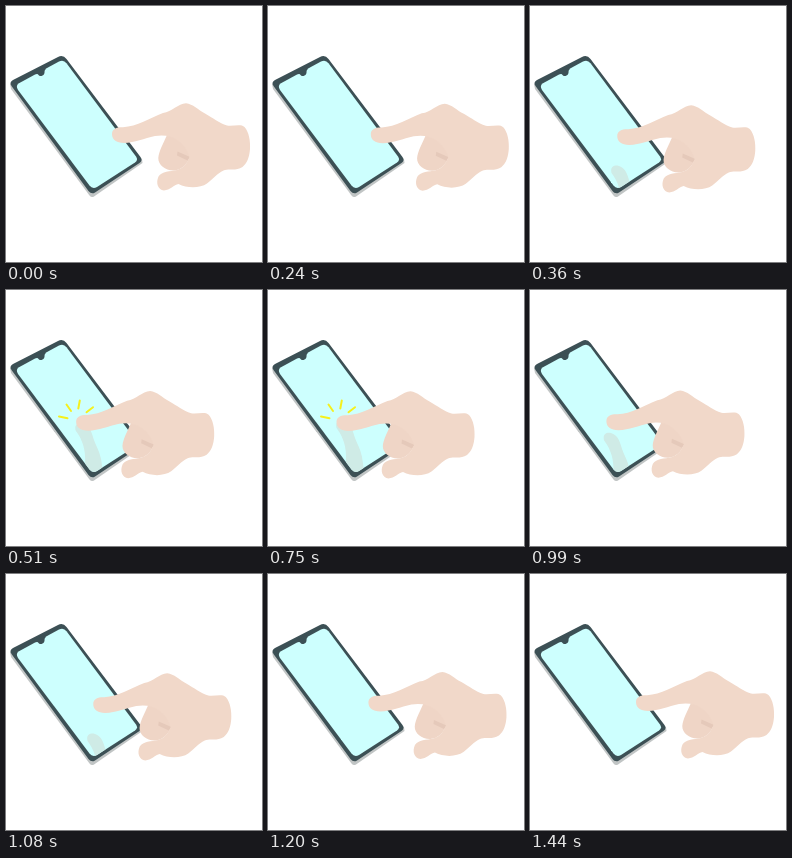
These frames come from a looping animation (256x256 px, 1470 ms). An HTML page:

```html
<!DOCTYPE html>
<html lang="en">
<head>
<meta charset="utf-8">
<title>Tap on a phone</title>
<style>
  html, body { margin: 0; width: 100%; height: 100%; overflow: hidden; background: #fff; }
  svg { display: block; width: 100%; height: 100%; }
</style>
</head>
<body>
<svg viewBox="0 0 256 256">
  <defs>
    <path id="glass" d="M12.500 77.500 L53 55.500 Q57.500 53.200 60.500 57.200 L130 150.500 Q132.500 154 129 156.500 L91 181 Q86.500 183.500 83.500 179.500 L12 84 Q9.500 80 12.500 77.500Z"/>
    <clipPath id="screen"><use href="#glass"/></clipPath>
  </defs>

  <path fill="#c1c5c5" d="M4 78 L7 75 L136 153 L136.500 157 L88 190.500 Q85.500 192 83.500 189.500 L5 83Z"/>
  <path fill="#3c5055" d="M7 74 L52 51 Q57 48.500 60.500 53 L134.500 151 Q137 154.500 133.500 157 L89 186.500 Q85.500 188.800 82.500 185 L5.500 80 Q3 76 7 74Z"/>
  <use href="#glass" fill="#cdfffe"/>
  <path fill="#3c5055" d="M29.500 68.300 Q32 67.700 32.300 68.700 C34 71.500 39 69.500 38.500 66 Q38.200 64.500 40 62.800 L37 61 L28 66Z"/>

  <g clip-path="url(#screen)">
    <path id="mirror" fill="#cfebe6" d="M68.500 138 C67 132 71 129.500 76 131 C81 132.500 84 137 86 145 C88 152 92 157 94 167 L97 187 L92 260 L70 240 C80 205 78 180 78 166 C78 153 73 144 68.500 138Z"/>
  </g>

  <g id="sparks" stroke="#f6f01c" stroke-width="2" stroke-linecap="round">
    <path d="M53 126.500 L61.500 128.300 M60.500 114.500 L65 121 M73.800 110.500 L72.300 118.500 M80.500 122.200 L87 117.200"/>
  </g>

  <g id="hand">
    <path fill="#efd5c6" d="M161 129 C157 138 153 145 152.300 152 C152 159 160 165 168 164.500 C176 164 181 158 184 151 L181 134 L170 126Z"/>
    <path fill="#e5c9ba" d="M171.500 145.500 L184 151 L181.500 154.500 L171 149.500Z"/>
    <path fill="#f1d8c9" d="M106 128 C106 122.500 111 121 117 121.200 C131 120.500 144 112 157 107 C166 105.500 172 98 180 97.300 C187 98 192 104 199 107.500 C207 112 213 117 221 119.500 C227 120.500 235 117.500 238.500 121 C243 126 244.500 135 244 143 C243.500 150 241.500 157 236.500 161 C230 165.500 223 162 217.500 164.500 C211 167.500 207 173 201 177.500 C194 182.500 181 182.500 172.500 178 C168 179 164 184 158 184.500 C152 184 149.500 177 152.500 170.500 C156 165 164 165.500 171 164 C178 162 181 157 183.500 151 C182 145 178 139 172 134.500 C166 130 158 128.500 149 130 C138 132.500 129 136.500 118 137 C110 137 106 133.500 106 128Z"/>
  </g>
</svg>
<script>
  const LOOP = 1470, TICK = 30;
  const PRESS = { from: 90, steps: 18 };
  const LIFT = { from: 720, steps: 24 };
  const [hand, mirror, sparks] = ["hand", "mirror", "sparks"].map(id => document.getElementById(id));

  const ease = x => x < 0.5 ? 4 * x ** 3 : 1 - 4 * (1 - x) ** 3;
  const move = (el, x, y) => el.setAttribute("transform", `translate(${x.toFixed(2)} ${y.toFixed(2)})`);

  function progress(t, { from, steps }) {
    const n = Math.floor((t - from) / TICK);
    return ease(Math.min(1, Math.max(0, n / steps)));
  }

  function draw(t) {
    const p = progress(t, PRESS) - progress(t, LIFT);
    move(hand, -37.5 * p, 4 * p);
    move(mirror, 26 * (1 - p), 58 * (1 - p));
    mirror.style.visibility = p > 0.1 ? "visible" : "hidden";
    sparks.style.visibility = p > 0.93 ? "visible" : "hidden";
  }

  const start = performance.now();
  function frame() {
    draw((performance.now() - start) % LOOP);
    requestAnimationFrame(frame);
  }
  frame();
</script>
</body>
</html>
```
